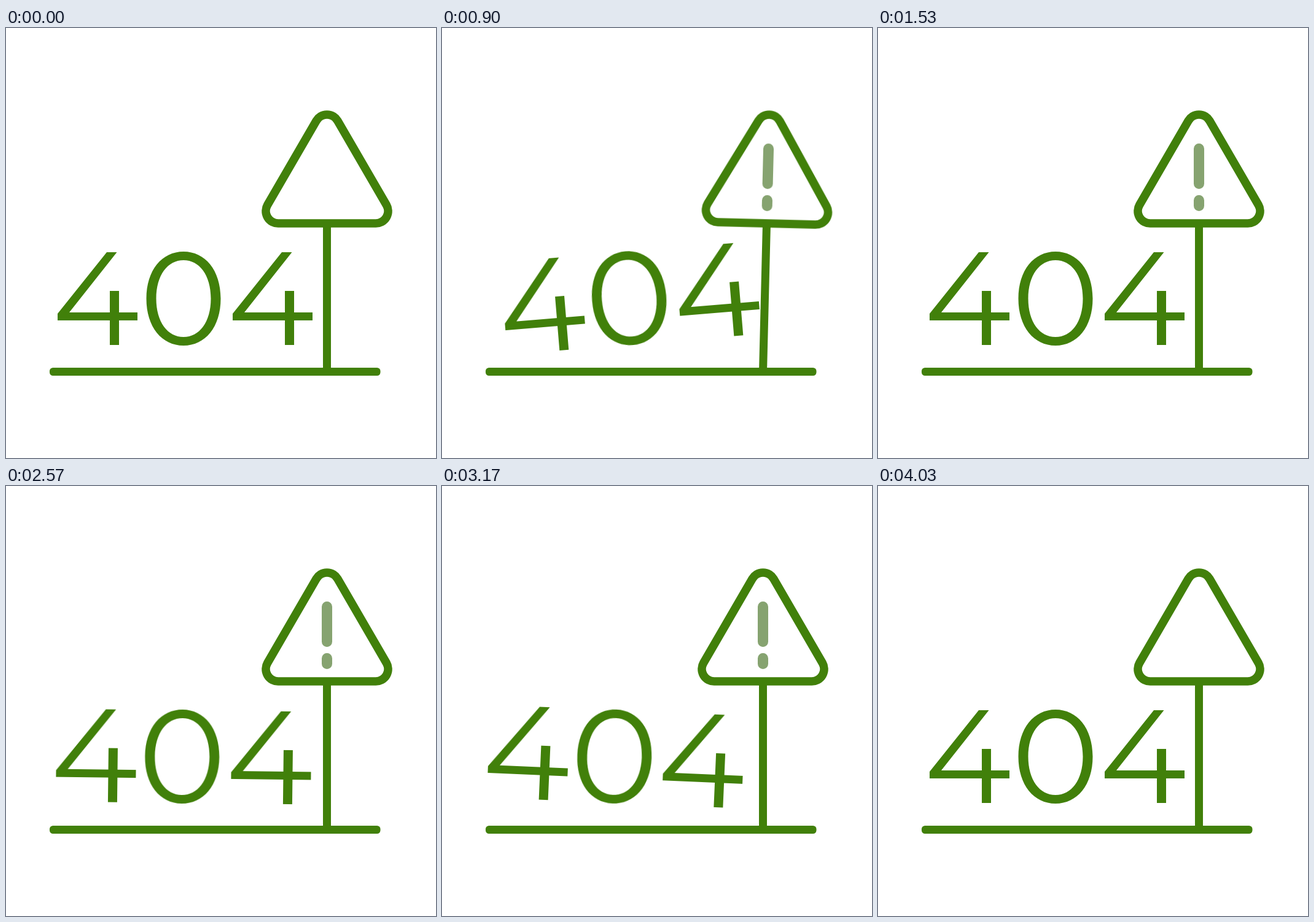
Recreate the animation shown at these times as an HTML page. Size 700 px wide and 700 px high, loop 5.03 s.

```html
<!DOCTYPE html>
<html lang="en">
<head>
<meta charset="utf-8">
<title>404</title>
<style>
  html, body { margin: 0; width: 100%; height: 100%; overflow: hidden; background: #fff; }
  svg { display: block; width: 100%; height: 100%; }

  .line { fill: none; stroke: #41800a; stroke-width: 13; }
  .frame { stroke-width: 13.6; }
  .mark { fill: none; stroke: #86a370; stroke-width: 17; stroke-linecap: round; }
  .ground, .digits { fill: #41800a; }

  /* Sine easing applies between keyframes unless one sets its own. */
  .digits, .sign { animation: 5030ms cubic-bezier(.364, 0, .636, 1) infinite; }
  .digits { transform-origin: 289px 250px; animation-name: swing; }
  .sign { transform-origin: 522.5px 559.5px; animation-name: sway; }
  .mark { animation: toggle 5030ms step-end infinite; }

  /* The number swings back, hits the post and settles; twice per loop. */
  @keyframes swing {
    0%, .66%, 29.14%, 50.33%, 78.81%, 100% { transform: rotate(0deg); }
    5.96%, 55.63% { transform: rotate(12.5deg); animation-timing-function: cubic-bezier(.6, 0, .8, 1); }
    16.89%, 66.56% { transform: rotate(-5.8deg); }
    21.39%, 71.06% { transform: rotate(3deg); }
  }

  @keyframes sway {
    0%, 15.89%, 30.46%, 65.56%, 80.13%, 100% { transform: rotate(0deg); }
    23.18%, 72.85% { transform: rotate(8deg); }
  }

  /* Each hit switches the exclamation mark on or off. */
  @keyframes toggle {
    0%, 65.56%, 100% { opacity: 0; }
    15.89% { opacity: 1; }
  }
</style>
</head>
<body>
<svg viewBox="0 0 700 700" role="img" aria-label="404">
  <defs>
    <path id="four" d="M84 476V465L164 365H180.5L103 463H169V428H184V463H214V476H184V516H169V476Z"/>
  </defs>
  <rect class="ground" x="71" y="553" width="538.5" height="13" rx="5.5"/>
  <g class="sign">
    <path class="line" d="M522.5 559.5V318"/>
    <path class="line frame" d="M443 318H602A20 20 0 0 0 619.3 288L539.8 151A20 20 0 0 0 505.2 151L425.7 288A20 20 0 0 0 443 318Z"/>
    <path class="mark" d="M522.5 196.5V253.5M522.5 280.5V289.5"/>
  </g>
  <g class="digits">
    <use href="#four"/>
    <path fill-rule="evenodd" d="M289 364C324 364 349.5 394 349.5 440.5S324 517 289 517S228.5 487 228.5 440.5S254 364 289 364Z
      M289 378C314.5 378 333.5 402 333.5 440.5S314.5 503 289 503S244.5 479 244.5 440.5S263.5 378 289 378Z"/>
    <use href="#four" x="285"/>
  </g>
</svg>
</body>
</html>
```
